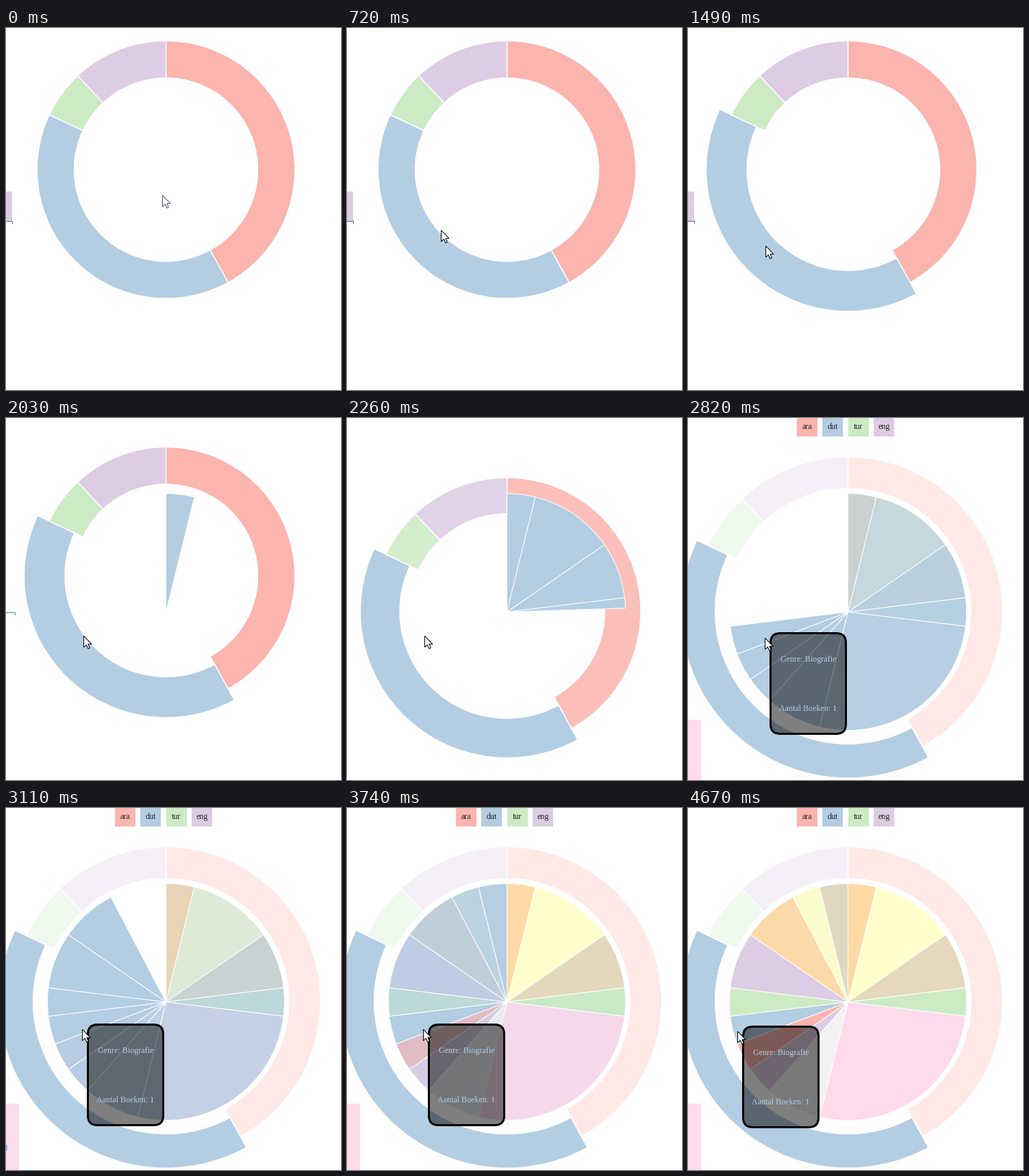
Animation of 489 by 529 pixels, one loop 4.75 s. Source, as a matplotlib script:

```python
import numpy as np
import matplotlib.pyplot as plt
from matplotlib.animation import FuncAnimation
from matplotlib.colors import to_rgb
from matplotlib.patches import FancyBboxPatch, Polygon, Rectangle, Wedge

W, H, DPI = 489, 529, 100
INTERVAL, LOOP = 25, 4750
PX = 72 / DPI

RED, BLUE, GREEN, PURPLE = "#fbb4ae", "#b3cde3", "#ccebc5", "#decbe4"
ORANGE, YELLOW, BROWN, PINK, GREY = "#fed9a6", "#ffffcc", "#e5d8bd", "#fddaec", "#f2f2f2"

LANGS = [("ara", 42, RED), ("dut", 40, BLUE), ("tur", 6, GREEN), ("eng", 12, PURPLE)]
GENRES = [(1, ORANGE), (3, YELLOW), (2, BROWN), (1, GREEN), (7, PINK), (2, GREY), (1, PURPLE),
          (1, RED), (1, BLUE), (1, GREEN), (2, PURPLE), (2, ORANGE), (1, YELLOW), (1, BROWN)]

# Runs of screen updates: first time, last time, count.
RUNS = [(0, 0, 1), (70, 560, 8), (630, 1110, 7), (1260, 1490, 4), (1890, 2030, 3),
        (2100, 2410, 5), (2490, 2970, 7), (3050, 3110, 2), (3200, 3510, 5),
        (3590, 3740, 3), (3830, 4060, 4), (4120, 4600, 7), (4670, 4670, 1)]
STEPS = np.concatenate([np.linspace(*run) for run in RUNS])

# Pointer path: time, x, y.
PATH = np.array([(0, 228, 244), (560, 147, 284), (900, 125, 310), (1190, 125, 310),
                 (1490, 113, 318), (2600, 113, 318), (3000, 111, 323),
                 (4100, 111, 323), (4600, 72, 326)])
ARROW = np.array([(0, 0), (0, 16.5), (3.8, 13), (6.3, 18.6), (8.8, 17.5), (6.4, 12), (11.5, 12)])


def ease(t, start, duration):
    """Cubic in-out progress from 0 to 1."""
    u = min(max((t - start) / duration, 0), 1)
    return 4 * u**3 if u < 0.5 else 1 - 4 * (1 - u)**3


def lerp(a, b, k):
    return a + (b - a) * k


def mix(a, b, k):
    return lerp(np.array(to_rgb(a)), np.array(to_rgb(b)), k)


def angles(values):
    """Slice edges in degrees, clockwise from the top."""
    return np.concatenate([[0], np.cumsum(values)]) * 360 / sum(values) - 90


# The small margin keeps float rounding from losing a pixel.
fig = plt.figure(figsize=((W + 0.01) / DPI, (H + 0.01) / DPI), dpi=DPI, facecolor="white")
ax = fig.add_axes([0, 0, 1, 1])
ax.set_xlim(0, W)
ax.set_ylim(H, 0)
ax.axis("off")


def add(patch):
    return ax.add_patch(patch)


def label(x, y, text, color, size=12, font="Liberation Serif", z=3):
    return ax.text(x, y, text, color=color, fontsize=size * PX, family=font,
                   ha="center", va="baseline", zorder=z)


# Parts of the neighbouring chart at the left edge
old_bar = add(Rectangle((-5, 239), 13.5, 43, fc=PURPLE, lw=0))
axis_line, = ax.plot([], [], lw=PX, solid_capstyle="butt")
new_bar = add(Rectangle((-5, 432), 24, 110, fc=PINK, lw=0))
bar_text, = ax.plot([0.5, 0.5], [492, 501], lw=2 * PX, solid_capstyle="butt")
side_text = label(1, 48, "g", "#2ca02c", 11, "Liberation Sans")
border, = ax.plot([0, W], [528.5, 528.5], color="#cccccc", lw=PX)

# Ring and pie
ring_edges = angles([value for _, value, _ in LANGS])
ring = [add(Wedge((233.5, 207), 188, a, b, width=54, fc=color, ec="white", lw=1.5 * PX, zorder=2))
        for (_, _, color), a, b in zip(LANGS, ring_edges, ring_edges[1:])]
pie_edges = angles([value for value, _ in GENRES])
pie = [add(Wedge((233.5, 283.5), 173, a, b, fc=BLUE, ec="white", lw=PX, zorder=3))
       for a, b in zip(pie_edges, pie_edges[1:])]

legend = []
for i, (name, _, color) in enumerate(LANGS):
    x = 158.5 + 37.5 * i
    legend.append(add(Rectangle((x, -3), 30, 30, fc=color, lw=0)))
    legend.append(label(x + 15, 16, name, "#222222"))

tip_box = add(FancyBboxPatch((0, 0), 110, 147, boxstyle="round,pad=0,rounding_size=14",
                             fc=(0, 0, 0, 0.5), ec="black", lw=3 * PX, zorder=5))
tip_text = [label(0, 0, text, BLUE, z=6) for text in ("Genre: Biografie", "Aantal Boeken: 1")]
pointer = add(Polygon(ARROW, closed=True, fc="white", lw=PX, zorder=8))


def draw_side(t):
    old_bar.set_alpha(1 - ease(t, 1860, 200))
    moved = t >= 1960
    x, y = (12.5, 284.5) if moved else (9, 282.5)
    axis_line.set_data([-2, x, x], [y, y, y + 4])
    axis_line.set_color("#3f9a78" if moved else "#63638a")
    axis_line.set_visible(t < 2150)
    side_text.set_visible(2300 <= t < 2490)
    border.set_visible(2300 <= t < 2490)
    new_bar.set_y(lerp(H + 1, 432, ease(t, 2450, 500)))
    bar_text.set_color(mix("#8fb8dc", PINK, ease(t, 3050, 460)))
    bar_text.set_visible(t >= 2970)


def draw_ring(t):
    spread = ease(t, 1983, 750)
    center = (233.5, lerp(207, 282.5, ease(t, 1880, 350)))
    outer, inner = lerp(188.2, 225.7, spread), lerp(134, 179.5, spread)
    grown = 1 + lerp(0.1, 0.08, spread) * ease(t, 700, 410)
    for wedge, (name, _, color) in zip(ring, LANGS):
        chosen = name == "dut"
        scale = grown if chosen else 1
        wedge.set_center(center)
        wedge.set_radius(outer * scale)
        wedge.set_width((outer - inner) * scale)
        wedge.set_facecolor(color if chosen else mix(color, "white", 0.7 * spread))


def draw_pie(t):
    for i, (wedge, (_, color)) in enumerate(zip(pie, GENRES)):
        sweep = ease(t, 1910 + 100 * i, 100)
        wedge.set_visible(sweep > 0.05)
        wedge.set_theta2(lerp(pie_edges[i], pie_edges[i + 1], sweep))
        wedge.set_facecolor(mix(BLUE, color, ease(t, 1950 + 100 * i, 2000)))


def draw_pointer(t):
    x, y = (np.interp(t, PATH[:, 0], PATH[:, k]) for k in (1, 2))
    pointer.set_xy(ARROW + (np.round(x) + 0.5, np.round(y) + 0.5))
    pointer.set_edgecolor("#4a5578" if t < 630 else "#2f7a4a" if 2300 <= t < 2490 else "black")
    left, top = np.round(x) + 8.5, np.round(y) - 6.5
    tip_box.set_x(left)
    tip_box.set_y(top)
    for text, drop in zip(tip_text, (41.5, 113.5)):
        text.set_position((left + 55, top + drop))
    for part in [tip_box, *tip_text]:
        part.set_visible(t >= 2770)


def update(index):
    t = STEPS[STEPS <= index * INTERVAL + 20].max()
    draw_side(t)
    draw_ring(t)
    draw_pie(t)
    draw_pointer(t)
    for part in legend:
        part.set_visible(t >= 2490)
    return []


anim = FuncAnimation(fig, update, frames=LOOP // INTERVAL, interval=INTERVAL,
                     repeat=True, repeat_delay=0, blit=False)
plt.show()
```
